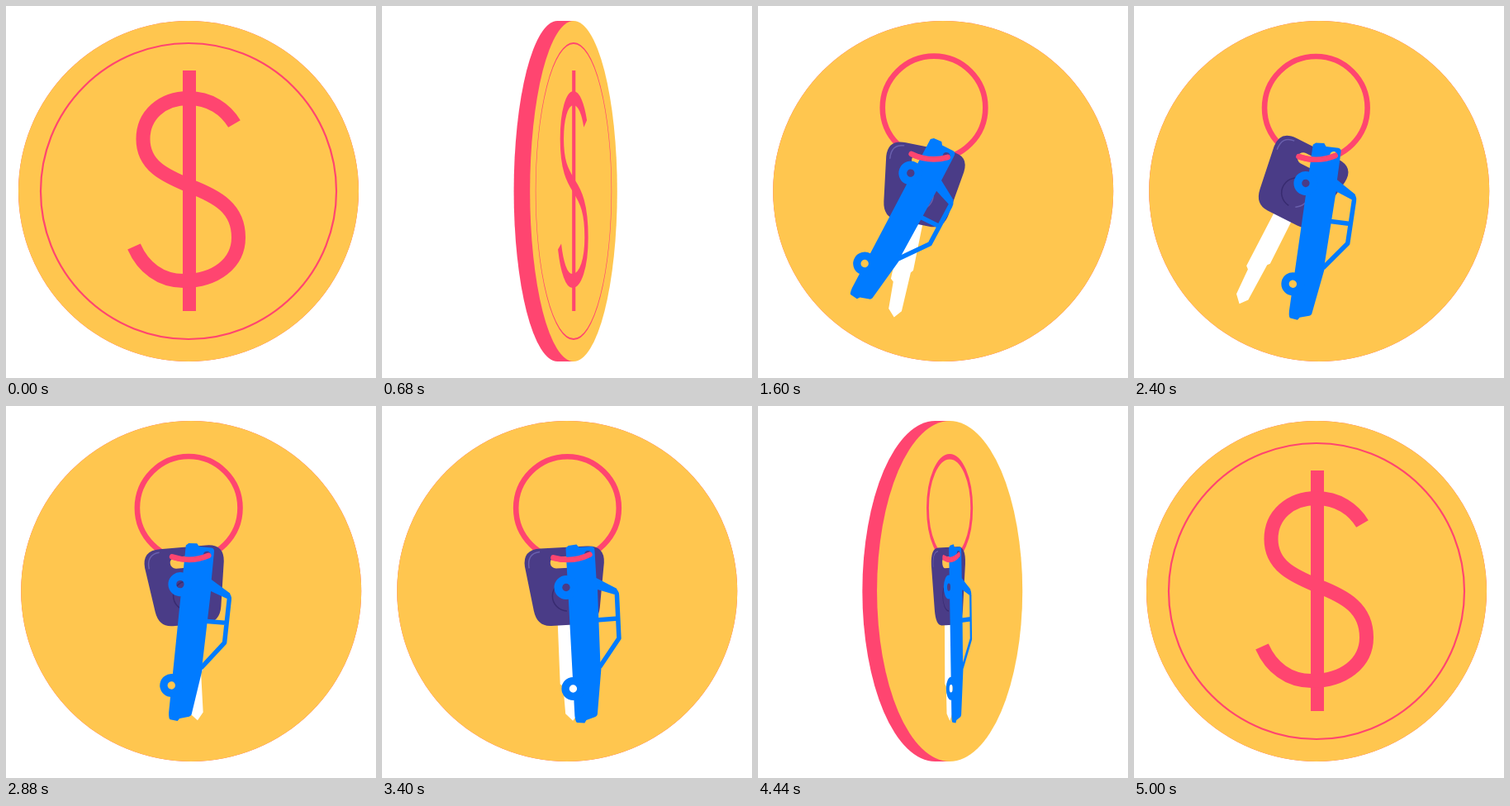
An HTML page for the animation above (5040 ms loop, 448 by 450 pixels).

```html
<!DOCTYPE html>
<html lang="en">
<head>
<meta charset="utf-8">
<title>Coin and keys</title>
<style>
  html, body { margin: 0; width: 100%; height: 100%; overflow: hidden; background: #fff; }
  svg { display: block; width: 100%; height: 100%; }
  .pink { fill: none; stroke: #ff4570; }
</style>
</head>
<body>
<svg viewBox="0 0 448 450">
  <defs>
    <mask id="holes" maskUnits="userSpaceOnUse" x="190" y="150" width="120" height="250">
      <rect x="190" y="150" width="120" height="250" fill="#fff"/>
      <circle cx="222.5" cy="219.5" r="4.7"/>
      <circle cx="231" cy="342" r="4.7"/>
      <circle cx="249" cy="179.5" r="4.5"/>
    </mask>
  </defs>

  <g fill="#ff4570">
    <ellipse id="back" cy="224" ry="206"/>
    <rect id="rim" y="18" height="412"/>
  </g>
  <ellipse id="front" cy="224" ry="206" fill="#ffc64f"/>

  <!-- both faces are drawn around 0,0 -->
  <g id="dollar" class="pink">
    <circle r="179" stroke-width="2.2"/>
    <g transform="translate(-221 -224)">
      <path stroke-width="16" d="M222 78V369"/>
      <path stroke-width="17" d="M276.500 142.500C266 125 247 111.500 221 111.500C189 111.500 166 132 166 161
        C166 193 192 205 222 217.500C257 231 281.500 245 281.500 280C281.500 311 254 332.500 215 332.500
        C187 332.500 166 316 155 291"/>
    </g>
  </g>

  <g id="keys">
    <g id="hang">
      <circle class="pink" r="62.3" stroke-width="6.6"/>
      <g id="key">
        <path fill="#fff" d="M-12 75L-13 148L-9.500 151L-8.500 184L0 193L7.500 184L9 136L11.500 133V75Z"/>
        <path fill="#4a3c87" fill-rule="evenodd" d="M-28-17H28Q50-17 48 4L40 58Q37 77 20 77H-20Q-37 77-40 58
          L-48 4Q-50-17-28-17ZM-10-6A7 7 0 0 0-10 8H10A7 7 0 0 0 10-6Z"/>
        <g fill="none" stroke-width="1.5">
          <path stroke="#6a60ad" d="M-43 6Q-45-12-29-13"/>
          <path stroke="#382b70" d="M3 24A18 18 0 1 0 0 60"/>
          <path stroke="#6a60ad" d="M8 58A18 18 0 0 0 17 38"/>
        </g>
      </g>
      <g id="sway">
        <g id="car">
          <g transform="translate(-252 -179.5)" mask="url(#holes)" fill="#007bff">
            <path d="M222 172L225 169L235 167.500L238 171L253 170Q257 170 257 175L259 208L284 221L281 228L260.500 222
              L264 312L265 318L260.500 373Q260 375 258 376L247 380L245 383.500L236 383Q234 383 233 375Z"/>
            <circle cx="222.500" cy="219.500" r="14.500"/>
            <circle cx="231" cy="342" r="14"/>
            <path fill="none" stroke="#007bff" stroke-width="5.500" stroke-linejoin="round"
              d="M259 213L279 222Q284 224 284 229L286.500 281L263 316M259 259L285 257"/>
          </g>
        </g>
        <path class="pink" stroke-width="6.600" stroke-linecap="round" d="M-17 60A62.300 62.300 0 0 0 27 56.200"/>
      </g>
    </g>
  </g>
</svg>
<script>
  const LOOP = 5040, STEP = 40;
  const el = Object.fromEntries([...document.querySelectorAll('[id]')].map(e => [e.id, e]));
  const set = (e, attrs) => { for (const k in attrs) e.setAttribute(k, attrs[k]); };
  const move = (e, x, y, rest = '') => set(e, { transform: `translate(${x} ${y}) ${rest}` });

  // turning points of the two pendulums: time in ms, angle in degrees
  const carSwing = [[800, 3], [1330, -22], [1690, 40], [1985, -26], [2290, 19], [2640, -15.5],
    [2980, 15], [3320, -1], [3640, 6], [4000, 1]];
  const keySwing = [[900, 4], [1400, -14], [1760, 35], [2060, -22], [2400, 30], [2740, -15],
    [3080, 22], [3420, 0], [3760, 5], [4100, 2]];

  function swing(points, t) {
    if (t <= points[0][0]) return points[0][1];
    for (let i = 1; i < points.length; i++) {
      const [t0, a] = points[i - 1], [t1, b] = points[i];
      if (t < t1) return a + (b - a) * (1 - Math.cos(Math.PI * (t - t0) / (t1 - t0))) / 2;
    }
    return points.at(-1)[1];
  }

  // half a turn of the coin, 0 to 1
  function flip(t, start) {
    const u = Math.min(1, Math.max(0, (t - start) / 800));
    return u + u * (1 - u) * (0.2 + 0.276 * u);
  }

  function draw(t) {
    const turn = flip(t, 400) + flip(t, 4200);
    const cos = Math.cos(Math.PI * turn), sin = Math.abs(Math.sin(Math.PI * turn));
    const scale = Math.max(0.001, Math.abs(cos));
    const depth = 20.6 * sin ** 1.5;
    const side = turn % 1 < 0.5 ? 1 : -1;
    const mid = 222.6 - 1.6 * cos;
    const face = mid + side * depth / 2;

    set(el.back, { cx: mid - side * depth / 2, rx: 206 * scale });
    set(el.rim, { x: mid - depth / 2, width: depth });
    set(el.front, { cx: face, rx: 206 * scale });
    for (const [e, shown] of [[el.dollar, cos >= 0], [el.keys, cos < 0]]) {
      set(e, { display: shown ? 'inline' : 'none' });
      move(e, face, 224, `scale(${scale} 1)`);
    }

    const car = swing(carSwing, t), key = swing(keySwing, t);
    move(el.hang, 0.3 - 0.37 * car, -100.5 - 0.02 * Math.abs(car));
    move(el.key, -3.8 - 0.2 * car, 64.5, `rotate(${key - 3.3})`);
    set(el.sway, { transform: `rotate(${0.33 * car})` });
    move(el.car, 28, 56, `rotate(${0.67 * car})`);
  }

  const begin = performance.now();
  function tick() {
    const t = (performance.now() - begin) % LOOP;
    draw(Math.floor(t / STEP) * STEP);
    requestAnimationFrame(tick);
  }
  tick();
</script>
</body>
</html>
```
